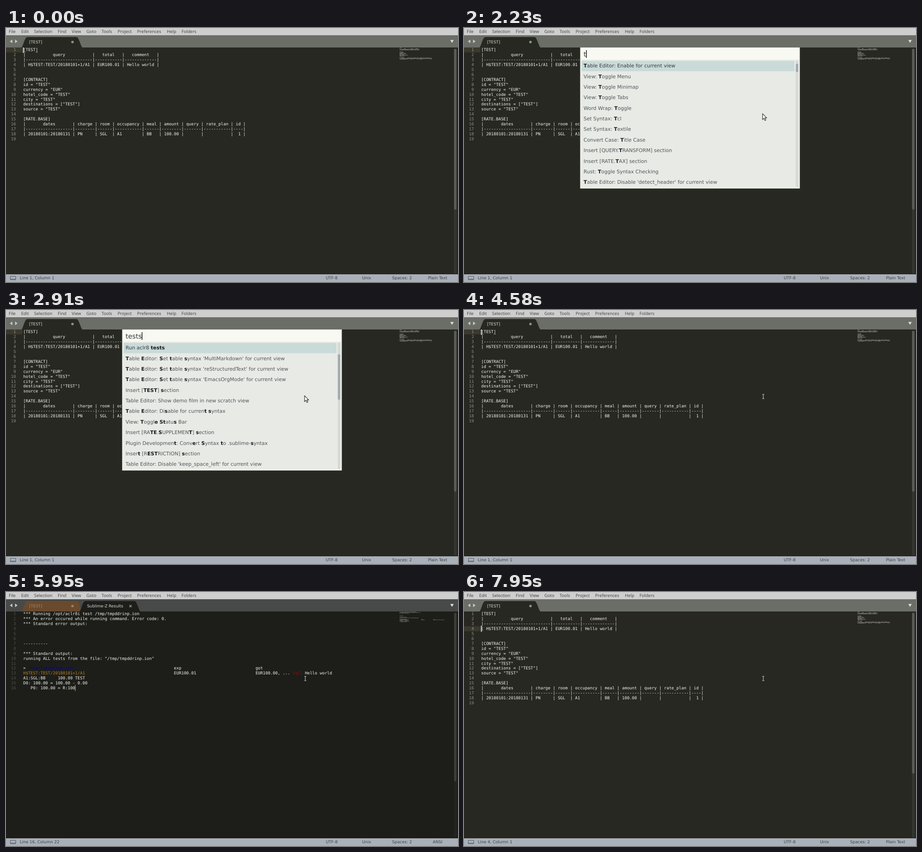
These frames come from a looping animation (998x561 px, 8000 ms). An HTML page:

```html
<!DOCTYPE html>
<html lang="en">
<head>
<meta charset="utf-8">
<title>Editor test run</title>
<style>
  html, body { margin: 0; width: 100%; height: 100%; overflow: hidden; background: #272822; }
  svg { display: block; width: 998px; height: 561px; }
  text { white-space: pre; font-family: "DejaVu Sans", sans-serif; text-rendering: geometricPrecision; }
  .menu { font: 9.5px "Noto Sans", sans-serif; fill: #454545; }
  .code, .num { font: 9.07px "DejaVu Sans Mono", monospace; fill: #f4f4ee; }
  .num { fill: #8f908a; text-anchor: end; }
  .dim .num { fill: #54504a; }
  .tab { font-size: 8.85px; fill: #dcdcd6; }
  .status { font-size: 9px; fill: #3c4046; }
  .item { font-size: 11.03px; fill: #50575a; }
  .item.on { fill: #363a44; }
  .item tspan { font-weight: bold; fill: #191b1d; }
  .keys { font-size: 8.8px; fill: #82908f; }
  .query { font-size: 14.7px; fill: #363636; }
</style>
</head>
<body>
<svg id="stage" viewBox="0 0 998 561"></svg>
<script>
const LOOP = 8000, LINE = 10.92, CHAR = 5.46, LEFT = 38, TOP = 43, ROW = 23.36;

const dashes = header => header.replace(/[^|]/g, '-');
const queryHead = '|           query           |   total   |   comment   |';
const rateHead = '|       dates       | charge | room | occupancy | meal | amount | query | rate_plan | id |';
const sourceLines = [
  '[TEST]', queryHead, dashes(queryHead),
  '| H$TEST:TEST/20180101+1/A1 | EUR100.01 | Hello world |',
  '', '', '[CONTRACT]', 'id = "TEST"', 'currency = "EUR"', 'hotel_code = "TEST"',
  'city = "TEST"', 'destinations = ["TEST"]', 'source = "TEST"', '',
  '[RATE.BASE]', rateHead, dashes(rateHead),
  '| 20180101:20180131 | PN     | SGL  | A1        | BB   | 100.00 |       |           |  1 |', ''
];
const resultLines = [
  '*** Running /opt/aclr8i test /tmp/tmpddrinp.ion',
  '*** An error occured while running command. Error code: 0.',
  '*** Standard error output:', '', '', '', '----------', '',
  '*** Standard output:', 'running ALL tests from the file: "/tmp/tmpddrinp.ion"', '',
  '> /tmp/tmpddrinp.ion'.padEnd(61) + 'exp'.padEnd(33) + 'got',
  'H$TEST:TEST/20180101+1/A1'.padEnd(61) + 'EUR100.01'.padEnd(33) + 'EUR100.00, ... fail Hello world',
  'A1:SGL:BB     100.00 TEST', 'D0: 100.00 = 100.00 - 0.00', '   P0: 100.00 = R:100'
];
const resultColors = [
  [/\/tmp\/\S+(?= +exp)/, '#0000b4'], [/^H\$\S+/, '#b5832a'], [/fail/, '#8a1010']
];

// Asterisks mark the matched letters.
const lists = {
  all: {
    items: ['CSV: Justify columns', 'CSV: Select column', 'CSV: Set delimiter',
      'CSV: Sort Column (Ascending)', 'CSV: Sort Column (Descending)',
      'CSV: Sort Current Column (Ascending)', 'CSV: Sort Current Column (Descending)',
      'CSV: Sort by column (Ascending)', 'CSV: Sort by column (Descending)',
      'CSV: Use First Row As Header', 'Changelog', 'Check aclr8 version'],
    keys: { 0: 'Ctrl+,,', 1: 'Ctrl+,, s', 7: 'Ctrl+,, Up', 8: 'Ctrl+,, Down' },
    selected: 11, y: 70.8, thumb: [90, 18]
  },
  one: {
    items: ['*T*able Editor: Enable for current view', 'View: *T*oggle Menu',
      'View: *T*oggle Minimap', 'View: *T*oggle Tabs', 'Word Wrap: *T*oggle',
      'Set Syntax: *T*cl', 'Set Syntax: *T*extile', 'Convert Case: *T*itle Case',
      'Insert [QUERY.*T*RANSFORM] section', 'Insert [RATE.*T*AX] section',
      'Rust: *T*oggle Syntax Checking',
      "*T*able Editor: Disable 'detect_header' for current view"],
    keys: {}, selected: 0, y: 72.2, thumb: [79, 18]
  },
  word: {
    items: ['Run aclr8 *tests*',
      ...['MultiMarkdown', 'reStructuredText', 'EmacsOrgMode'].map(name =>
        `*T*able *E*ditor: *S*et *t*able *s*yntax '${name}' for current view`),
      'Insert [*TEST*] *s*ection', 'Table Editor: Show demo film in new scratch view',
      '*T*able *E*ditor: Di*s*able for curren*t* *s*yntax',
      'View: *T*oggl*e* *St*atu*s* Bar', 'Insert [RA*TE*.*S*UPPLEMEN*T*] *s*ection',
      'Plugin Developmen*t*: Conv*e*rt *S*yntax *t*o .sublime-*s*yntax',
      'Inser*t* [R*EST*RICTION] *s*ection',
      "Table Editor: Disable 'keep_space_left' for current view"],
    keys: {}, selected: 0, y: 72.2, thumb: [98, 100]
  }
};

const rect = (x, y, w, h, fill, extra = '') =>
  `<rect x="${x}" y="${y}" width="${w}" height="${h}" fill="${fill}" ${extra}/>`;
const text = (cls, x, y, body, extra = '') =>
  `<text class="${cls}" x="${x}" y="${y}" ${extra}>${body}</text>`;
const path = (d, fill, extra = '') => `<path d="${d}" fill="${fill}" ${extra}/>`;

const tabShape = (x, w) =>
  `M${x} 43C${x + 4} 41 ${x + 7} 20 ${x + 13} 20H${x + w - 13}C${x + w - 8} 20 ${x + w - 4} 41 ${x + w} 43Z`;

function paint(line) {
  for (const [pattern, color] of resultColors)
    line = line.replace(pattern, match => `<tspan fill="${color}">${match}</tspan>`);
  return line;
}

function page(lines, format = line => line) {
  return lines.map((line, i) => {
    const y = 51.3 + i * LINE;
    return text('num', 22, y, i + 1) + text('code', LEFT, y, format(line));
  }).join('');
}

function minimap(lines, opacity) {
  const marks = lines.flatMap((line, i) => [...line.matchAll(/\S+/g)].map(m =>
    rect(869 + m.index * 0.79, 43.6 + i * 1.46, m[0].length * 0.79, 0.9, '#f0f0ea')));
  return `<g opacity="${opacity}">${marks.join('')}</g>`;
}

function tabBar(color) {
  const arrows = path('M14 25.5V33.5L8.5 29.5ZM20 25.5V33.5L25.5 29.5Z', '#c6c8c4');
  return rect(0, 16, 998, 27, color) + arrows + path('M981 26.5H988.6L984.8 32.8Z', '#e2e3e0');
}

function scrollbar(height, thumb, track) {
  return rect(989, 46, 6, 496, track, 'rx="2"') + rect(989.4, 46, 5.2, height, thumb, 'rx="2"');
}

function editor() {
  return `<g id="editor">${rect(0, 43, 998, 501, '#272822')}${tabBar('#6b6e67')}
    ${path(tabShape(34, 135), '#272822')}${text('tab', 51, 33.8, '[TEST]')}
    <circle cx="146.8" cy="31" r="2.8" fill="#90918c"/>
    ${rect(0, TOP, 36, LINE, '#3b392e', 'id="rowMark"')}${page(sourceLines)}
    <g id="brackets">${rect(38, 53, 5, 0.8, '#b8b8b0')}${rect(65.5, 53, 5, 0.8, '#b8b8b0')}</g>
    ${minimap(sourceLines, 0.5)}${scrollbar(355, '#5b5c58', '#34352f')}</g>`;
}

function results() {
  return `<g id="results" class="dim">${rect(0, 43, 998, 501, '#1d1e19')}${tabBar('#474a49')}
    ${path(tabShape(34, 135), '#6a4a2d')}
    ${text('tab', 51, 33.8, '[TEST]', 'style="fill:#a2886c"')}
    <circle cx="146.8" cy="31" r="2.8" fill="#94816c"/>
    ${path(tabShape(162, 135), '#1d1e19')}${text('tab', 179, 33.8, 'Sublime-Z Results')}
    ${path('M272.5 28.7L277.3 33.5M277.3 28.7L272.5 33.5', 'none', 'stroke="#a5a6a2" stroke-width="1.3"')}
    ${page(resultLines, paint)}${minimap(resultLines, 0.4)}${scrollbar(372, '#3d3e3a', '#23241f')}</g>`;
}

function listView(name) {
  const { items, keys, selected, y, thumb } = lists[name];
  const rows = items.map((item, i) => {
    const top = y + i * ROW;
    const on = i === selected;
    const label = item.replace(/\*(.+?)\*/g, '<tspan>$1</tspan>');
    const first = i === 0;
    const key = keys[i] ? text('keys', first ? 690 : 725.5, top + 13.4, keys[i],
      first ? '' : 'text-anchor="end"') : '';
    return (on ? rect(260, top + 0.5, 469.5, ROW - 0.6, '#c9dad8') : '') +
      text('item' + (on ? ' on' : ''), 264, top + 15.1, label) + key;
  });
  return `<g id="list-${name}">${rows.join('')}${rect(732.5, 72, 5.6, 279, '#d6d9d4', 'rx="2"')}
    ${rect(732.7, thumb[0], 5.2, thumb[1], '#a3aab0', 'rx="1.5"')}</g>`;
}

function palette() {
  return `<g id="palette">${rect(256.5, 43, 485, 311.5, '#eff1ec')}
    ${rect(258.5, 45, 481, 25, '#f8f9f2')}${rect(258.5, 70, 481, 282, '#e7eae5')}
    ${text('query', 264, 62.8, '', 'id="query"')}
    <g clip-path="url(#listBox)">${Object.keys(lists).map(listView).join('')}</g></g>`;
}

const menu = { File: 6, Edit: 33.5, Selection: 62, Find: 114.3, View: 145, Goto: 177.6,
  Tools: 211, Project: 246.6, Preferences: 289.6, Help: 355.3, Folders: 387.6 };

document.getElementById('stage').innerHTML = `
  <clipPath id="listBox">${rect(257, 72, 484, 279.4, '#fff')}</clipPath>
  ${rect(0, 0, 998, 16, '#cecece')}
  ${Object.entries(menu).map(([name, x]) => text('menu', x, 11.3, name)).join('')}
  ${editor()}${results()}${palette()}
  ${rect(0, 0, 1.6, 12, '#fff', 'id="caret"')}
  ${rect(0, 544, 998, 17, '#a9b0b9')}
  ${path('M9.5 548.5H21.5V556H9.5ZM9.5 554.6H21.5', 'none', 'stroke="#555a60"')}
  ${text('status', 30.5, 555.2, '', 'id="position"')}${text('status', 706, 555.2, 'UTF-8')}
  ${text('status', 786, 555.2, 'Unix')}${text('status', 852.6, 555.2, 'Spaces: 2')}
  ${text('status', 953, 555.2, '', 'id="syntax" text-anchor="middle"')}
  <g id="arrow">${path('M659.3 189.3V202.2L662.2 199.4L664.3 204.3L666.5 203.3L664.4 198.6H668.3Z',
    '#fff', 'stroke="#222" stroke-width="1.1"')}</g>
  <g id="beam">${path('M658.6 186.3H660.4L660.8 186.8L661.2 186.3H663M660.8 186.8V195.4M658.6 195.9H660.4L660.8 195.4L661.2 195.9H663',
    'none', 'stroke="#e6e6e0" stroke-width="1"')}</g>`;

const el = id => document.getElementById(id);
const at = (track, t) => track.findLast(([start]) => start <= t)[1];
const show = (id, on) => el(id).setAttribute('visibility', on ? 'inherit' : 'hidden');
const set = (id, attrs) => Object.entries(attrs).forEach(([k, v]) => el(id).setAttribute(k, v));

const viewTrack = [[0, 'editor'], [490, 'palette'], [4580, 'editor'], [4750, 'results'], [6980, 'editor']];
const lineTrack = [[0, 1], [7590, 2], [7780, 3], [7950, 4]];
const queryTrack = [[0, ''], [2230, 't'], [2320, 'te'], [2520, 'tes'], [2710, 'test'], [2910, 'tests']];
const advances = [0, 0.392, 1.007, 1.528, 1.92, 2.441];
const fade = (from, to, a, b) => [0, 1, 2].map(i =>
  [from + (to - from) * i / 2, a + (b - a) * (i + 1) / 3]);
const out = (from, to) => fade(from, to, 1, 0);
const back = (from, to) => fade(from, to, 0, 1);
const blinkTrack = [[0, 1], ...out(130, 220), [490, 1], ...out(1000, 1080), ...back(1620, 1740),
  [2170, 0.66], [2230, 1], ...out(3450, 3570), ...back(3980, 4200), [4580, 1],
  ...out(5250, 5380), ...back(5830, 5950), ...out(6440, 6530), [6980, 1], [7460, 0.6], [7590, 1]];

function caretBox(view, line, typed) {
  if (view === 'palette')
    return { x: 263.8 + advances[typed.length] * 14.7, y: 49, width: 1.5, height: 17, fill: '#111' };
  const inResults = view === 'results';
  const top = TOP + (line - 1) * LINE;
  const y = Math.max(TOP, top - 1.3);
  return { x: inResults ? LEFT + 21 * CHAR - 0.4 : 37.5, y, width: inResults ? 1.2 : 1.6,
    height: top + 12 - y, fill: inResults ? '#e0a050' : '#fff' };
}

function draw(t) {
  const view = at(viewTrack, t), typed = at(queryTrack, t);
  const inResults = view === 'results', inPalette = view === 'palette';
  const line = inResults ? 16 : at(lineTrack, t);
  const list = typed.length > 2 ? 'word' : typed ? 'one' : 'all';
  show('editor', !inResults);
  show('results', inResults);
  show('palette', inPalette);
  show('arrow', inPalette);
  show('beam', t >= 4580);
  show('brackets', view === 'editor' && line === 1);
  for (const name in lists)
    el('list-' + name).setAttribute('display', name === list ? 'inline' : 'none');
  set('rowMark', { y: TOP + (line - 1) * LINE });
  set('caret', { ...caretBox(view, line, typed), opacity: at(blinkTrack, t) });
  el('query').textContent = typed;
  el('position').textContent = `Line ${line}, Column ${inResults ? 22 : 1}`;
  el('syntax').textContent = inResults ? 'ANSI' : 'Plain Text';
}

const start = performance.now();
function tick() {
  draw((performance.now() - start) % LOOP);
  requestAnimationFrame(tick);
}
tick();
</script>
</body>
</html>
```
